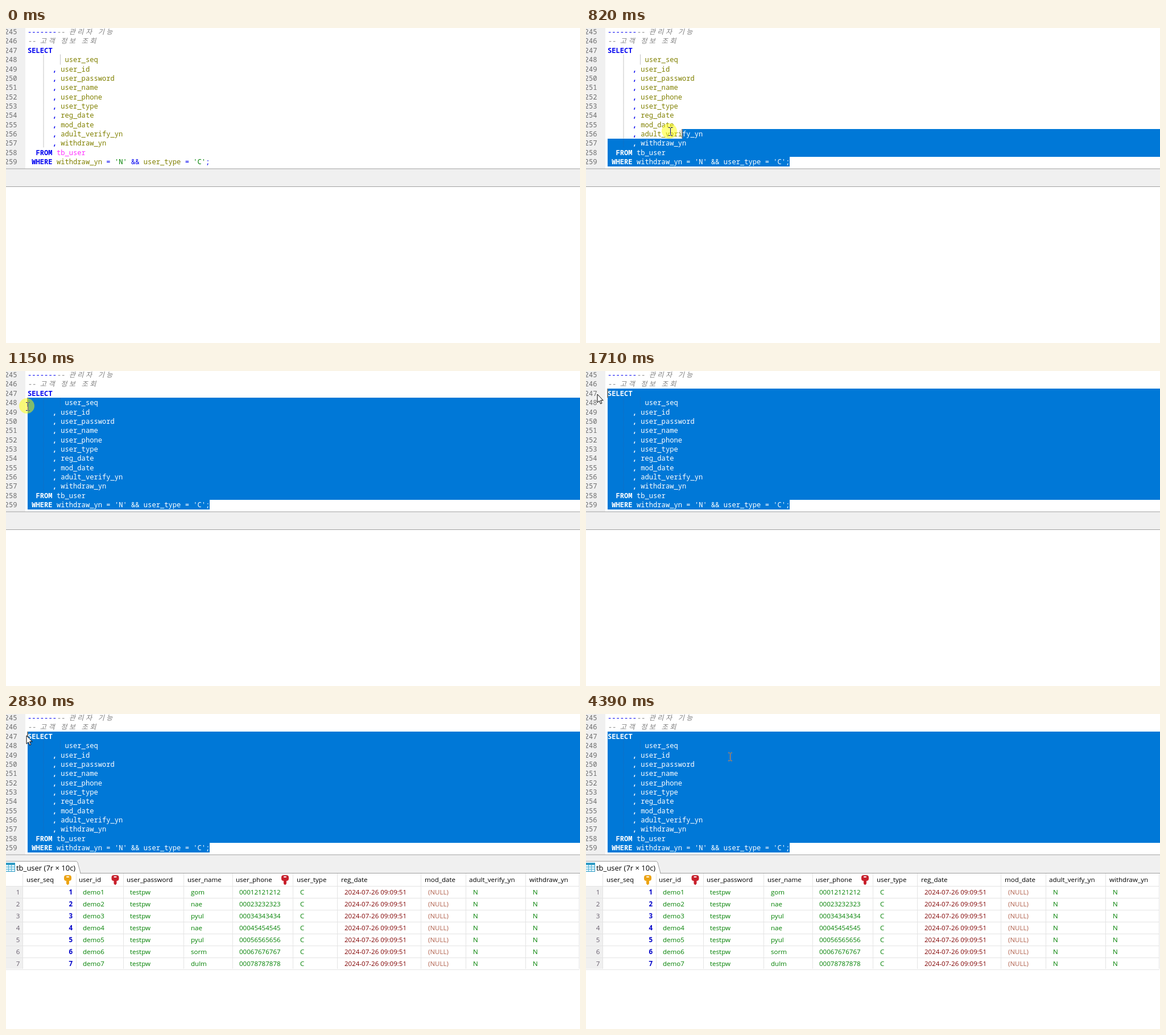
These frames come from a looping animation (1009x555 px, 4420 ms). An HTML page:

```html
<!DOCTYPE html>
<html lang="ko">
<head>
<meta charset="utf-8">
<title>SQL editor</title>
<style>
  html, body { margin: 0; width: 100%; height: 100%; overflow: hidden; background: #fff; }
  svg { display: block; isolation: isolate; }
  .code { font: 12.13px "Noto Sans Mono", "Noto Sans CJK KR", "Noto Sans CJK", monospace; }
  .grid { font: 500 11.55px "Open Sans", sans-serif; fill: #000; }
  .kw, .sep { font-weight: 700; }
  .kw, .sep, .op { fill: #0000f0; }
  .op { font-weight: 500; }
  .id { fill: #808000; }
  .tb { fill: #ff30ff; }
  .str { fill: #008000; }
  .rem { fill: #808080; font-style: italic; }
  .num { fill: #6c6c6c; }
  .guide { stroke: #8a8a8a; stroke-dasharray: 1 1; }
  .picked text { fill: #fff; }
  .picked .guide { stroke: #1b69b5; }
  .seq { fill: #0000c8; font-weight: 700; text-anchor: end; }
  .val { fill: #008000; }
  .date { fill: #800000; }
  .null { fill: #b0604c; }
  .row { fill: #665c6c; text-anchor: middle; }
  .invert { mix-blend-mode: difference; stroke: #fff; fill: none; }
</style>
</head>
<body>
<svg id="stage" width="1009" height="555" viewBox="0 0 1009 555"></svg>
<script>
const LOOP = 4420, CH = 7.28, LH = 16.36, LEFT = 38, W = 1009;
const lineTop = i => Math.round(-1.8 + LH * i);
const baseline = i => 11.1 + LH * i;
const colX = c => LEFT + CH * c;
const r = n => Math.round(n * 100) / 100;

const lines = [
  '--------- 관리자 기능',
  '-- 고객 정보 조회',
  'SELECT',
  '         user_seq',
  ...['id', 'password', 'name', 'phone', 'type'].map(s => '      , user_' + s),
  ...['reg_date', 'mod_date', 'adult_verify_yn', 'withdraw_yn'].map(s => '      , ' + s),
  '  FROM tb_user',
  " WHERE withdraw_yn = 'N' && user_type = 'C';"
];
const last = lines.length - 1;

const rules = [
  ['rem', /^-- .*/], ['kw', /^(SELECT|FROM|WHERE)/], ['tb', /^tb_\w+/], ['id', /^\w+/],
  ['str', /^'\w'/], ['sep', /^,/], ['op', /^(-|=|&&|;)/]
];

const text = (x, y, s, cls = '') => `<text x="${x}" y="${r(y)}" class="${cls}">${s.replace(/&/g, '&amp;')}</text>`;
const rect = (x, y, w, h, fill) => `<rect x="${x}" y="${y}" width="${w}" height="${h}" fill="${fill}"/>`;
const path = (d, attrs) => `<path d="${d}" ${attrs}/>`;

// Hangul takes two columns of the character grid
function codeLine(line, i) {
  let out = '', col = 0, rest = line;
  while (rest) {
    if (rest[0] === ' ') { col++; rest = rest.slice(1); continue; }
    const [cls, re] = rules.find(([, re]) => re.test(rest));
    const token = rest.match(re)[0];
    const xs = [];
    for (const c of token) {
      xs.push(r(colX(col)));
      col += c > '\u1000' ? 2 : 1;
    }
    out += text(cls === 'rem' ? xs.join(' ') : xs[0], baseline(i), token, cls);
    rest = rest.slice(token.length);
  }
  return out;
}

const code = path(`M66 ${lineTop(3)}V${lineTop(13)}M95.5 ${lineTop(3)}V${lineTop(4)}`, 'class="guide" fill="none"')
  + lines.map(codeLine).join('');
const numbers = lines.map((_, i) => text(-2.4, baseline(i), String(245 + i), 'num')).join('');

const heads = [[36, 'user_seq'], [128, 'user_id'], [212, 'user_password'], [319, 'user_name'], [404, 'user_phone'],
  [511, 'user_type'], [589, 'reg_date'], [736, 'mod_date'], [814, 'adult_verify_yn'], [920, 'withdraw_yn']];
const edges = [29, 123, 206, 312, 398, 504, 582, 729, 808, 913, 1007];
const people = ['gom', 'nae', 'pyul', 'nae', 'pyul', 'sorm', 'dulm'];
const tails = [12, 23, 34, 45, 56, 67, 78];

function key(x, color) {
  return `<g transform="translate(${x} 284)" fill="${color}"><rect x="-6.5" width="13" height="10" rx="4"/>`
    + '<path d="M-2.5 9H2.5V15L0 17.5L-2.5 15Z"/><rect x="-2.5" y="2" width="5" height="2" rx="1" fill="#fff"/></g>';
}

function gridRow(name, i) {
  const y = 317.7 + 21 * i, n = i + 1;
  const cells = [[21, n, 'row'], [117, n, 'seq'], [135, 'demo' + n, 'val'], [218, 'testpw', 'val'], [325, name, 'val'],
    [410, '000' + String(tails[i]).repeat(4), 'val'], [517, 'C', 'val'], [595, '2024-07-26 09:09:51', 'date'],
    [742, '(NULL)', 'null'], [821, 'N', 'val'], [926, 'N', 'val']];
  return cells.map(([x, s, cls]) => text(x, y, String(s), cls)).join('');
}

const tab = rect(0, 279, W, 1, '#f0f0f0') + rect(0, 280, W, 1, '#a0a0a0')
  + path('M-1 259.5H123Q125 259.5 126 262L131 280.5H-1Z', 'fill="#fff" stroke="#a0a0a0"')
  + rect(0, 280, 130, 2, '#fff') + rect(0, 262, 16, 16, '#2e9bc4') + rect(0, 266, 15, 11, '#dff3fb')
  + path('M0 269.5H15M0 273.5H15M4.5 266V277M9.5 266V277', 'stroke="#58b4d6"')
  + '<text x="18" y="275.5" font-size="13">tb_user (7r × 10c)</text>';

const table = rect(0, 303, 29, 146, '#f0f0f0')
  + path(edges.map(x => `M${x + .5} 281V449`).join('') + people.concat(0).map((_, i) => `M0 ${303.5 + 21 * i}H1008`).join(''),
    'stroke="#e4e4e4" fill="none"')
  + heads.map(([x, s]) => text(x, 296, s)).join('')
  + key(108.5, '#eca414') + key(192, '#c8202c') + key(490.5, '#c8202c')
  + people.map(gridRow).join('');

const stage = document.getElementById('stage');
stage.innerHTML = `
  <clipPath id="clip"><path id="area"/></clipPath>
  ${rect(0, 0, W, 555, '#fff')}${rect(0, 0, 34, 248, '#f0f0f0')}
  <g class="code">${numbers}${code}</g>
  <g class="code picked" clip-path="url(#clip)">${rect(LEFT - 1, 0, W, 248, '#0078d7')}${code}</g>
  ${rect(0, 248, W, 31, '#f0f0f0')}${path('M0 248H1009M0 279.5H1009', 'stroke="#a0a0a0"')}
  <g class="grid"><g id="tab">${tab}</g><g id="table">${table}</g></g>
  <path id="caret" class="invert" d="M.5 0V16"/>
  <circle id="press" r="13.5" fill="#ff0" fill-opacity=".5"/>
  <path id="beam" class="invert" d="M-3.5-7H-1L0-6L1-7H3.5M0-6V6M-3.5 7H-1L0 6L1 7H3.5"/>
  <path id="arrow" d="M.5.5V15.2L3.8 12.1L6.2 17.3L8.4 16.3L6.1 11.3H10.7Z" fill="#fff" stroke="#000"/>`;
const el = {};
for (const id of ['area', 'tab', 'table', 'caret', 'press', 'beam', 'arrow']) el[id] = document.getElementById(id);

// time, x, y of the pointer
const track = [
  [100, 855, 518], [430, 393, 240], [640, 393, 240], [700, 330, 233], [790, 170, 188], [820, 148, 182],
  [940, 78, 120], [970, 79, 116], [1120, 40, 63], [1150, 38, 62], [1300, 27, 50], [1450, 20, 41],
  [2000, 20, 41], [2010, 31, 39], [2130, 31, 39], [2140, 36, 38], [3220, 36, 38], [3370, 27, 48],
  [3890, 27, 48], [4120, 245, 64], [4260, 245, 64], [4390, 253, 75]
];

function pointer(t) {
  const i = track.findIndex(k => k[0] > t);
  if (i < 0) return track[track.length - 1].slice(1);
  if (!i) return track[0].slice(1);
  const a = track[i - 1], b = track[i], p = (t - a[0]) / (b[0] - a[0]);
  return [a[1] + (b[1] - a[1]) * p, a[2] + (b[2] - a[2]) * p];
}

const show = (node, on) => node.setAttribute('visibility', on ? 'visible' : 'hidden');
const move = (node, x, y) => node.setAttribute('transform', `translate(${r(x)} ${r(y)})`);
const within = (t, spans) => spans.some(([a, b]) => t >= a && t < b);

function render(now) {
  const t = now % LOOP;
  const tick = Math.floor((t - 10) / 30) * 30 + 10;
  const [x, y] = pointer(tick);

  // the selection follows the pointer one tick late
  const [sx, sy] = pointer(Math.min(tick - 30, 1460));
  const line = Math.max(2, Math.min(last, Math.floor((sy + 1.8) / LH)));
  const col = Math.max(0, Math.min(lines[line].length, Math.floor((sx - LEFT) / CH)));
  const from = Math.round(colX(col)), end = Math.round(colX(lines[last].length));
  const dragged = t >= 650;
  el.area.setAttribute('d', !dragged ? '' : line === last
    ? `M${from} ${lineTop(last)}H${end}V${lineTop(last + 1)}H${from}Z`
    : `M${from} ${lineTop(line)}H${W}V${lineTop(last)}H${end}V${lineTop(last + 1)}H${LEFT}V${lineTop(line + 1)}H${from}Z`);

  move(el.caret, from - .5, lineTop(line));
  show(el.caret, within(t, [[650, 2010], [2540, 3240], [3910, 4290]]));

  const arrow = x < 37 || y > 248;
  show(el.arrow, t >= 100 && arrow);
  show(el.beam, t >= 100 && !arrow);
  move(el.arrow, Math.round(x) - .5, Math.round(y) - .5);
  move(el.beam, Math.round(x) + .5, Math.round(y) + .5);
  show(el.press, within(t, [[650, 1710]]));
  move(el.press, x - 1.5, y - .5);

  show(el.tab, t >= 2770);
  show(el.table, t >= 2800);
}

const start = performance.now();
function loop() {
  render(performance.now() - start);
  requestAnimationFrame(loop);
}
loop();
</script>
</body>
</html>
```
